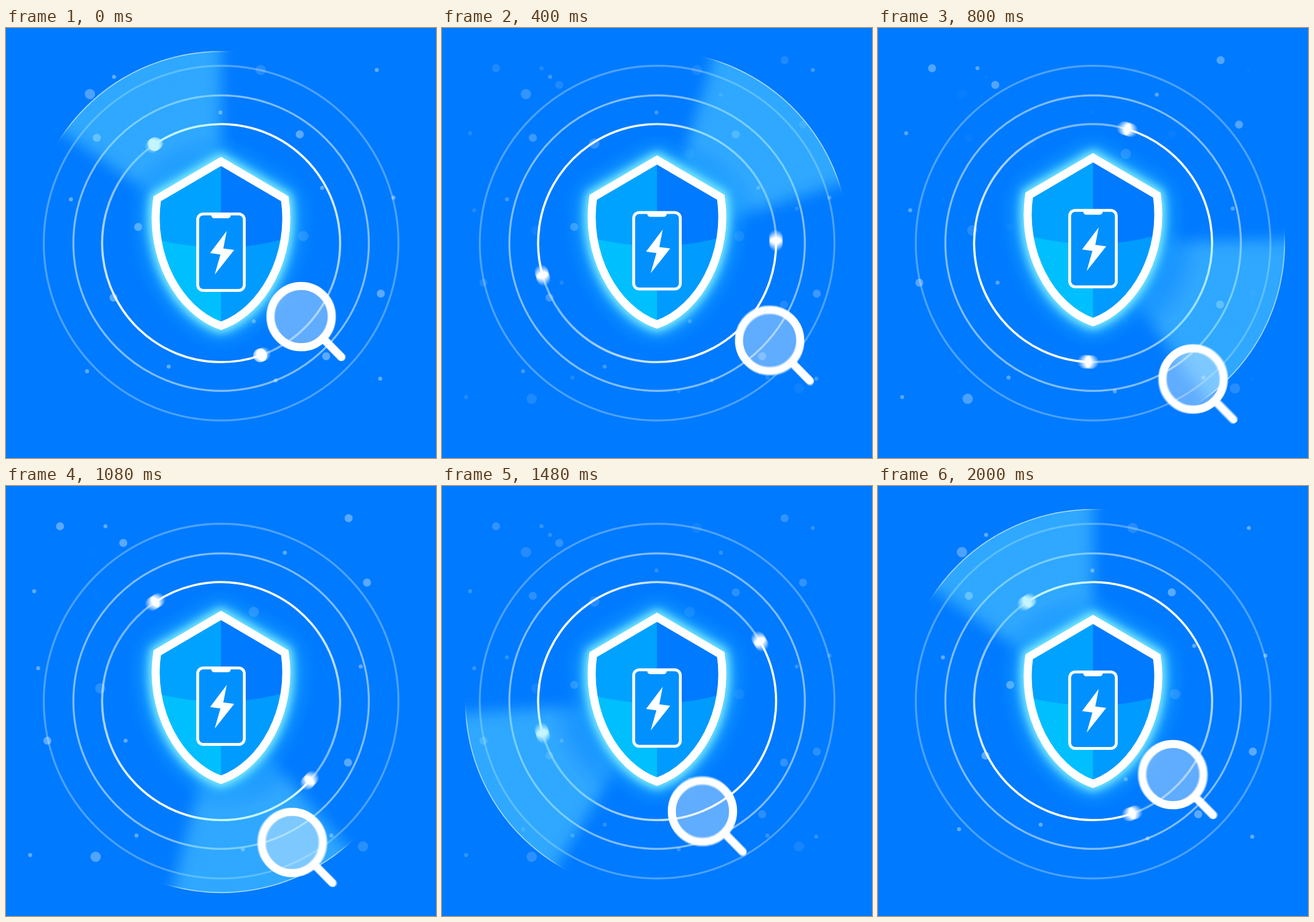
An HTML page that plays this animation: 748 by 748 pixels, repeating every 2.04 s.

```html
<!DOCTYPE html>
<html lang="en">
<head>
<meta charset="utf-8">
<title>Phone security scan</title>
<style>
  html, body { margin: 0; width: 100%; height: 100%; overflow: hidden; background: #007aff; }
  svg { display: block; width: 100vw; height: 100vh; }
  .blurred { isolation: isolate; }
  .blurred > * { mix-blend-mode: plus-lighter; }
</style>
</head>
<body>
<svg viewBox="0 0 748 748" xmlns="http://www.w3.org/2000/svg">
  <defs>
    <filter id="feather" filterUnits="userSpaceOnUse" x="-420" y="-520" width="560" height="640">
      <feGaussianBlur stdDeviation="13"/>
    </filter>
    <filter id="nearGlow" filterUnits="userSpaceOnUse" x="130" y="100" width="488" height="548">
      <feGaussianBlur stdDeviation="8"/>
    </filter>
    <filter id="farGlow" filterUnits="userSpaceOnUse" x="130" y="100" width="488" height="548">
      <feGaussianBlur stdDeviation="19"/>
    </filter>
    <radialGradient id="beamFill" gradientUnits="userSpaceOnUse" cx="0" cy="0" r="334">
      <stop offset=".24" stop-color="#70e6ff" stop-opacity="0"/>
      <stop offset=".57" stop-color="#70e6ff" stop-opacity=".42"/>
    </radialGradient>
    <mask id="wedge" maskUnits="userSpaceOnUse" x="-420" y="-520" width="560" height="640">
      <path d="M0 0V-480H-300L-655 -459Z" fill="#fff" filter="url(#feather)"/>
    </mask>
    <path id="shieldShape" d="M374 232L485 297C500 395 448 492 374 518C300 492 248 395 263 297Z"/>
    <clipPath id="shieldClip"><use href="#shieldShape"/></clipPath>
    <g id="magnifier">
      <circle r="50" fill="#fff" fill-opacity=".37"/>
      <g fill="none" stroke="#fff" stroke-width="14" stroke-linecap="round">
        <circle r="53.3"/>
        <path d="M41 41L70 70.5"/>
      </g>
    </g>
    <circle id="orb" cy="-207" r="12" fill="#fff"/>
  </defs>

  <rect width="748" height="748" fill="#007aff"/>
  <g id="dustA" fill="#fff"></g>
  <g id="dustB" fill="#fff"></g>

  <g transform="translate(374.2 374.2)" fill="none" stroke="#fff" stroke-width="3.4">
    <circle r="308.5" stroke-opacity=".3"/>
    <circle r="257" stroke-opacity=".5"/>
    <g id="orbit"></g>
  </g>
  <g id="orbs" class="blurred" transform="translate(374 374)"></g>

  <g transform="translate(374 374)">
    <g id="beam">
      <g mask="url(#wedge)">
        <circle r="334" fill="url(#beamFill)"/>
        <circle r="333.2" fill="none" stroke="#fff" stroke-width="1.8" stroke-opacity=".55"/>
      </g>
    </g>
  </g>

  <g id="shield">
    <use href="#shieldShape" fill="#2fc4ff" stroke="#2fc4ff" stroke-width="34" opacity=".75" filter="url(#farGlow)"/>
    <use href="#shieldShape" fill="#8ff8ff" stroke="#8ff8ff" stroke-width="25" opacity=".9" filter="url(#nearGlow)"/>
    <g clip-path="url(#shieldClip)">
      <path d="M240 220H374V530H240Z" fill="#00a2ff"/>
      <path d="M374 220H510V530H374Z" fill="#007aff"/>
      <path d="M240 362Q307 382 374 382V530H240Z" fill="#00bfff"/>
      <path d="M510 359Q441 382 374 382V530H510Z" fill="#009bff"/>
    </g>
    <use href="#shieldShape" fill="none" stroke="#fff" stroke-width="14"/>
    <rect x="333.5" y="323.5" width="81" height="133" rx="9.5" fill="#0091ff" stroke="#fff" stroke-width="5"/>
    <path d="M357 323H391V325Q391 331 385 331H363Q357 331 357 325Z" fill="#fff"/>
    <path d="M384 353L355 391.500L373 394L363 429L397 386L378 383.500Z" fill="#fff"/>
  </g>
  <g id="lens" class="blurred"></g>
</svg>

<script>
const LOOP = 2040, STEP = 40, TURN = 2000;
const SHUTTER = 20, SAMPLES = 8;
const ORB_ANGLES = [160.8, 326.3];
const byId = id => document.getElementById(id);

function add(parent, tag, attrs) {
  const node = document.createElementNS('http://www.w3.org/2000/svg', tag);
  for (const key in attrs) node.setAttribute(key, attrs[key]);
  return parent.appendChild(node);
}

// Each group: radius, opacity, then x y pairs.
const dust = {
  dustA: [
    [9, .3, '146 115 265 201'],
    [9, .14, '443 73 517 362'],
    [7, .36, '158 191 511 185 230 346 652 462 187 469 557 571'],
    [3.5, .38, '188 85 645 73 373 147 550 278 113 298 674 295 431 510 283 589 469 613 141 597 651 610']
  ],
  dustB: [
    [9, .33, '156 645'],
    [9, .16, '431 219 164 352 621 627'],
    [7, .36, '94 70 204 99 596 56 628 168 72 443 595 481'],
    [3.5, .38, '173 70 485 116 49 183 56 317 617 314 208 443 227 608 42 642 412 632 566 608']
  ]
};
for (const id in dust) {
  for (const [r, opacity, places] of dust[id]) {
    const xy = places.split(' ');
    for (let i = 0; i < xy.length; i += 2) {
      add(byId(id), 'circle', { cx: xy[i], cy: xy[i + 1], r, 'fill-opacity': opacity });
    }
  }
}

// Inner ring: one fading tail behind each orb.
const onRing = deg => {
  const a = deg * Math.PI / 180;
  return [207 * Math.sin(a), -207 * Math.cos(a)];
};
ORB_ANGLES.forEach((from, i) => {
  const to = ORB_ANGLES[1 - i] + (i ? 360 : 0);
  const [x1, y1] = onRing(from), [x2, y2] = onRing(to);
  const fade = add(byId('orbit'), 'linearGradient',
    { id: 'tail' + i, gradientUnits: 'userSpaceOnUse', x1, y1, x2, y2 });
  for (const [offset, alpha] of [[0, 1], [.4, 1], [1, .45]]) {
    add(fade, 'stop', { offset, 'stop-color': '#fff', 'stop-opacity': alpha });
  }
  add(byId('orbit'), 'path', {
    d: `M${x1} ${y1}A207 207 0 ${to - from > 180 ? 1 : 0} 1 ${x2} ${y2}`,
    stroke: `url(#tail${i})`, 'stroke-width': 3.8
  });
});

// Motion blur: additive copies spread over the shutter time.
const copies = (parent, href) => Array.from({ length: SAMPLES },
  () => add(byId(parent), 'use', { href, opacity: 1 / SAMPLES }));
const orbCopies = ORB_ANGLES.map(() => copies('orbs', '#orb'));
const lensCopies = copies('lens', '#magnifier');

const degrees = ms => 360 * ms / TURN;
const place = (node, transform) => node.setAttribute('transform', transform);

function draw(ms) {
  const angle = degrees(ms), wave = Math.cos(angle * Math.PI / 180);
  place(byId('beam'), `rotate(${angle})`);
  place(byId('orbit'), `rotate(${-angle})`);
  place(byId('shield'), `translate(0 ${3.5 * (wave - 1)})`);
  byId('dustA').setAttribute('opacity', (1 + wave) / 2);
  byId('dustB').setAttribute('opacity', (1 - wave) / 2);

  for (let i = 0; i < SAMPLES; i++) {
    const deg = degrees(Math.max(0, ms + SHUTTER * (i / (SAMPLES - 1) - .5)));
    const rad = deg * Math.PI / 180;
    orbCopies.forEach((set, k) => place(set[i], `rotate(${ORB_ANGLES[k] - deg})`));
    place(lensCopies[i],
      `translate(${512.9 + 60 * Math.sin(rad)} ${562 - 60 * Math.cos(rad)})`);
  }
}

let start;
function tick(now) {
  start ??= now;
  draw(Math.floor((now - start) % LOOP / STEP) * STEP);
  requestAnimationFrame(tick);
}
draw(0);
requestAnimationFrame(tick);
</script>
</body>
</html>
```
